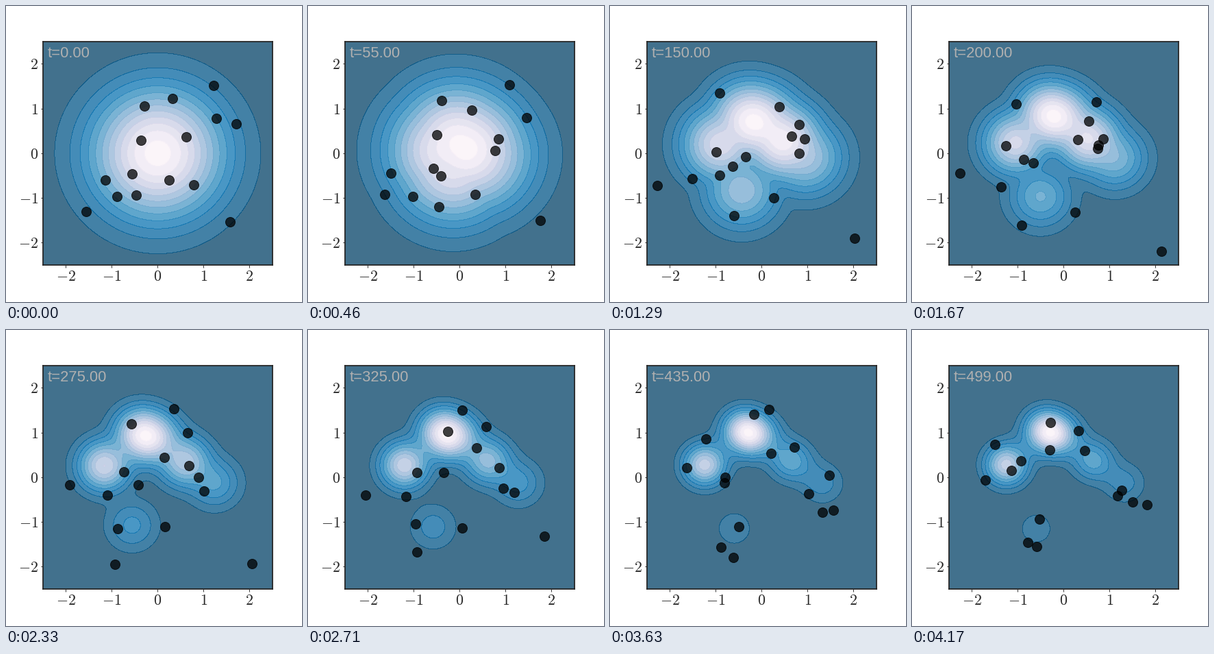
These frames come from a looping animation (432 px wide and 432 px high, 4.21 s). A matplotlib script:

```python
import numpy as np
import matplotlib.pyplot as plt
from matplotlib.animation import FuncAnimation

LOOP_MS = 4210
FRAMES = 101
LAST_STEP = 499
VAR = 0.1      # variance of each mixture component
NOISE = 0.075  # random step of a sample per picture

plt.rcParams.update({
    "mathtext.fontset": "cm",
    "font.family": "Liberation Sans",
    "font.size": 22,
    "axes.edgecolor": "#262626",
    "axes.linewidth": 1.8,
    "xtick.labelcolor": "#262626",
    "ytick.labelcolor": "#262626",
})

fig = plt.figure(figsize=(6, 6), dpi=72)
ax = fig.add_axes([0.125, 0.125, 0.775, 0.755])
ax.set(xlim=(-2.5, 2.5), ylim=(-2.5, 2.5))
ticks = range(-2, 3)
labels = [f"${v}$" for v in ticks]
ax.set_xticks(ticks, labels)
ax.set_yticks(ticks, labels)

# Target mixture: x, y, weight
MODES = [
    (-0.43, 1.08, 0.54),
    (-0.20, 0.93, 0.52),
    (0.10, 0.98, 0.12),
    (-1.25, 0.28, 0.70),
    (0.64, 0.38, 0.37),
    (1.33, -0.13, 0.20),
    (-0.60, -1.15, 0.128),
]
START = [(1.22, 1.52), (0.32, 1.23), (-0.29, 1.06), (1.28, 0.78),
         (1.71, 0.66), (0.62, 0.37), (-0.36, 0.29), (-0.56, -0.46),
         (-1.14, -0.60), (0.25, -0.60), (0.79, -0.71), (-0.89, -0.97),
         (-0.47, -0.94), (-1.56, -1.30), (1.58, -1.53)]
LEVELS = 0.08 * np.arange(14)
axis = np.linspace(-2.5, 2.5, 101)
X, Y = np.meshgrid(axis, axis)


def step(i):
    return min(5 * i, LAST_STEP)


def log_density(x, y, t):
    """Geometric path from a unit Gaussian to the mixture, cosine schedule."""
    a = np.sin(np.pi / 2 * t / LAST_STEP)**2
    mix = sum(w * np.exp(-((x - mx)**2 + (y - my)**2) / (2 * VAR))
              for mx, my, w in MODES)
    return -(1 - a) * (x**2 + y**2) / 2 + a * np.log(mix)


def gradient(x, y, t, h=1e-3):
    gx = log_density(x + h, y, t) - log_density(x - h, y, t)
    gy = log_density(x, y + h, t) - log_density(x, y - h, t)
    return np.array([gx, gy]) / (2 * h)


def langevin():
    """Positions of all samples for every picture of the loop."""
    rng = np.random.default_rng(7)
    pos = np.array(START).T
    path = [pos]
    for i in range(1, FRAMES):
        drift = NOISE**2 / 2 * gradient(*pos, step(i))
        pos = pos + drift + rng.normal(0, NOISE, pos.shape)
        path.append(pos)
    return path


path = langevin()
dots, = ax.plot([], [], "ko", ms=14, alpha=0.75)
clock = ax.text(-2.4, 2.15, "", color="#b0b0b0")


def update(i):
    t = step(i)
    for old in list(ax.collections):
        old.remove()
    logp = log_density(X, Y, t)
    ax.contourf(X, Y, np.exp(logp - logp.max()), levels=LEVELS,
                cmap="PuBu_r", alpha=0.75)
    dots.set_data(*path[i])
    clock.set_text(f"t={t:.2f}")
    return dots, clock


anim = FuncAnimation(fig, update, frames=FRAMES, interval=LOOP_MS / FRAMES,
                     init_func=lambda: update(0), repeat=True, repeat_delay=0)
plt.show()
```
